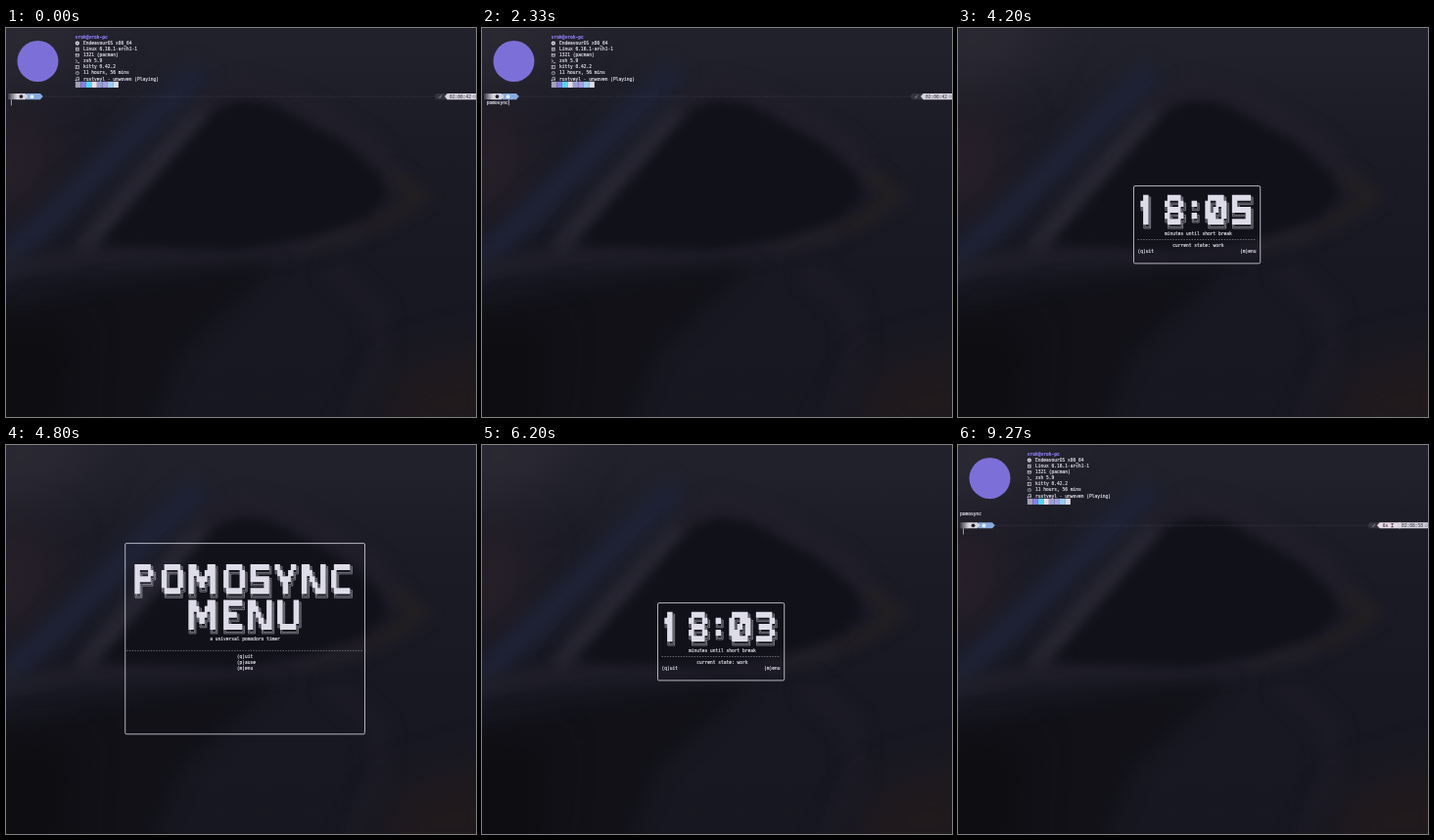
Animation of 480x398 px, one loop 9340 ms. Source, as an HTML page with a canvas:

```html
<!DOCTYPE html>
<html lang="en">
<head>
<meta charset="utf-8">
<title>Terminal pomodoro</title>
<style>
html, body { margin: 0; width: 100%; height: 100%; overflow: hidden; background: #17161f; }
canvas { display: block; width: 480px; height: 398px; }
</style>
</head>
<body>
<canvas id="stage"></canvas>
<script>
const W = 480, H = 398, LOOP = 9340;
const CW = 2.75, RH = 6.1, X0 = 2.1, Y0 = 6.05;   // terminal grid
const FONT = '"DejaVu Sans Mono", monospace';
const LIGHT = '#dddce8', TEXT = '#dedde8', PURPLE = '#8b7cf0';

const dpr = window.devicePixelRatio || 1;
const canvas = document.getElementById('stage');
canvas.width = W * dpr;
canvas.height = H * dpr;
const ctx = canvas.getContext('2d');

const colX = c => X0 + c * CW;
const rowY = r => Y0 + r * RH;
const midY = r => rowY(r) + RH / 2;

// Block letters with double-line shadows, six rows each
const glyphs = {
  P: ['██████╗  ', '██╔══██╗ ', '██████╔╝ ', '██╔═══╝  ', '██║      ', '╚═╝      '],
  O: [' ██████╗ ', '██╔═══██╗', '██║   ██║', '██║   ██║', '╚██████╔╝', ' ╚═════╝ '],
  M: ['███╗   ███╗ ', '████╗ ████║ ', '██╔████╔██║ ', '██║╚██╔╝██║ ', '██║ ╚═╝ ██║ ', '╚═╝     ╚═╝ '],
  S: ['███████╗', '██╔════╝', '███████╗', '╚════██║', '███████║', '╚══════╝'],
  Y: ['██╗   ██╗', '╚██╗ ██╔╝', ' ╚████╔╝ ', '  ╚██╔╝  ', '   ██║   ', '   ╚═╝   '],
  N: ['███╗   ██╗', '████╗  ██║', '██╔██╗ ██║', '██║╚██╗██║', '██║ ╚████║', '╚═╝  ╚═══╝'],
  C: [' ██████╗', '██╔════╝', '██║     ', '██║     ', '╚██████╗', ' ╚═════╝'],
  E: ['███████╗', '██╔════╝', '█████╗  ', '██╔══╝  ', '███████╗', '╚══════╝'],
  U: ['██╗   ██╗', '██║   ██║', '██║   ██║', '██║   ██║', '╚██████╔╝', ' ╚═════╝ '],
  0: [' ██████╗ ', '██╔═████╗', '██║██╔██║', '████╔╝██║', '╚██████╔╝', ' ╚═════╝ '],
  1: [' ██╗    ', '███║    ', '╚██║    ', ' ██║    ', ' ██║    ', ' ╚═╝    '],
  3: ['██████╗ ', '╚════██╗', ' █████╔╝', ' ╚═══██╗', '██████╔╝', '╚═════╝ '],
  4: ['██╗  ██╗', '██║  ██║', '███████║', '╚════██║', '     ██║', '     ╚═╝'],
  5: ['███████╗', '██╔════╝', '███████╗', '╚════██║', '███████║', '╚══════╝'],
  6: [' ██████╗ ', '██╔════╝ ', '███████╗ ', '██╔═══██╗', '╚██████╔╝', ' ╚═════╝ '],
  7: ['███████╗', '╚════██║', '    ██╔╝', '   ██╔╝ ', '   ██║  ', '   ╚═╝  '],
  8: [' █████╗ ', '██╔══██╗', '╚█████╔╝', '██╔══██╗', '╚█████╔╝', ' ╚════╝ '],
  ':': ['     ', ' ██╗ ', ' ╚═╝ ', ' ██╗ ', ' ╚═╝ ', '     ']
};
const corners = { '╔': [1, 1], '╗': [-1, 1], '╚': [1, -1], '╝': [-1, -1] };

function rect(x, y, w, h, color) {
  ctx.fillStyle = color;
  ctx.fillRect(x, y, w, h);
}

function poly(points, color, c = ctx) {
  c.fillStyle = color;
  c.beginPath();
  points.forEach(([x, y]) => c.lineTo(x, y));
  c.fill();
}

function line(points, color, width, c = ctx) {
  c.strokeStyle = color;
  c.lineWidth = width;
  c.beginPath();
  points.forEach(([x, y]) => c.lineTo(x, y));
  c.stroke();
}

function disc(x, y, r, color) {
  ctx.fillStyle = color;
  ctx.beginPath();
  ctx.arc(x, y, r, 0, Math.PI * 2);
  ctx.fill();
}

// Drawn large and scaled down so the advance stays exact
function text(str, col, row, color = TEXT, weight = '') {
  ctx.save();
  ctx.translate(colX(col), midY(row) + 1.7);
  ctx.scale(0.1, 0.1);
  ctx.font = `${weight} ${CW * 10 / 0.602}px ${FONT}`;
  ctx.fillStyle = ctx.strokeStyle = color;
  ctx.lineWidth = 1.6;
  ctx.fillText(str, 0, 0);
  ctx.strokeText(str, 0, 0);
  ctx.restore();
}

function shadowCell(ch, x, y) {
  const a = 0.65, b = 0.75, hw = CW / 2, hh = RH / 2;
  const seg = (...pts) => pts.forEach(([px, py], i) =>
    i ? ctx.lineTo(x + px, y + py) : ctx.moveTo(x + px, y + py));
  for (const k of [-1, 1]) {
    if (ch === '═') seg([-hw, k * b], [hw, k * b]);
    else if (ch === '║') seg([k * a, -hh], [k * a, hh]);
    else {
      const [sx, sy] = corners[ch];
      seg([sx * hw, k * sy * b], [k * sx * a, k * sy * b], [k * sx * a, sy * hh]);
    }
  }
}

function bigText(str, col, row) {
  const solid = new Path2D();
  ctx.beginPath();
  for (const letter of str) {
    const rows = glyphs[letter];
    rows.forEach((cells, r) => {
      for (const run of cells.matchAll(/█+/g))
        solid.rect(colX(col + run.index), rowY(row + r), run[0].length * CW, RH);
      [...cells].forEach((ch, c) => {
        if (ch !== ' ' && ch !== '█') shadowCell(ch, colX(col + c + 0.5), midY(row + r));
      });
    });
    col += rows[0].length + 1;
  }
  ctx.strokeStyle = LIGHT;
  ctx.lineWidth = 0.5;
  ctx.stroke();
  ctx.fillStyle = LIGHT;
  ctx.fill(solid);
}

function frame(c0, r0, c1, r1) {
  ctx.strokeStyle = LIGHT;
  ctx.lineWidth = 0.8;
  ctx.beginPath();
  ctx.roundRect(colX(c0 + 0.5), midY(r0), (c1 - c0) * CW, (r1 - r0) * RH, 1.4);
  ctx.stroke();
}

function dashes(x0, x1, y, color, width) {
  ctx.setLineDash([1.4, CW - 1.4]);
  line([[x0, y], [x1, y]], color, width);
  ctx.setLineDash([]);
}

function makeBackdrop() {
  const layer = document.createElement('canvas');
  layer.width = W;
  layer.height = H;
  const c = layer.getContext('2d');
  c.lineJoin = 'round';
  const base = c.createLinearGradient(0, 0, 0, H);
  base.addColorStop(0, '#22222d');
  base.addColorStop(0.25, '#1c1c27');
  base.addColorStop(0.6, '#181823');
  base.addColorStop(1, '#171721');
  c.fillStyle = base;
  c.fillRect(0, 0, W, H);
  const blob = (blur, color, ...points) => {
    c.filter = `blur(${blur}px)`;
    poly(points, color, c);
  };
  const band = (blur, color, width, ...points) => {
    c.filter = `blur(${blur}px)`;
    line(points, color, width, c);
  };
  // Warm and cool haze
  blob(24, '#2a2832', [-40, -40], [110, -40], [60, 50], [-40, 70]);
  blob(22, '#261f28', [-40, 90], [50, 85], [40, 175], [-40, 205]);
  band(9, '#1f2336', 26, [-20, 255], [55, 185], [165, 75], [200, 45]);
  // Light rim around the dark hollow
  band(7, '#282733', 20, [78, 228], [130, 165], [205, 82]);
  band(8, '#211f2a', 20, [200, 80], [240, 62], [290, 74], [370, 120], [405, 165]);
  band(7, '#231f22', 16, [395, 150], [425, 172], [380, 200], [300, 222]);
  band(8, '#201f2a', 18, [-20, 250], [90, 232], [250, 231], [360, 210]);
  blob(6, '#11111a', [96, 222], [150, 160], [214, 84], [240, 74], [272, 78],
    [345, 118], [382, 150], [388, 172], [365, 195], [310, 215], [235, 226]);
  // Lower folds
  blob(10, '#111117', [-30, 292], [110, 262], [275, 240], [240, 275], [180, 330], [140, 430], [-30, 430]);
  blob(20, '#0e0e12', [-40, 310], [70, 300], [60, 430], [-40, 430]);
  band(9, '#1c1b26', 16, [330, 245], [380, 290], [382, 340], [345, 410]);
  blob(20, '#201a1d', [400, 350], [510, 320], [510, 430], [375, 430]);
  return layer;
}
const backdrop = makeBackdrop();

function infoIcons() {
  const x = colX(25) + 2, at = r => midY(r) + 0.4;
  const box = (r, h) => {
    ctx.strokeStyle = TEXT;
    ctx.lineWidth = 0.6;
    ctx.strokeRect(x - 1.7, at(r) - h / 2, 3.5, h);
  };
  disc(x, at(1), 2.1, TEXT);
  disc(x, at(1), 0.7, '#20202b');
  rect(x - 1.8, at(2) - 1.9, 3.6, 3.8, '#b5b4c2');
  rect(x - 0.5, at(2) - 1.2, 1, 2.4, '#3a3946');
  box(3, 2.6);
  line([[x - 1.7, at(3)], [x + 1.8, at(3)]], TEXT, 0.6);
  line([[x - 1.8, at(4) - 1.7], [x - 0.2, at(4)], [x - 1.8, at(4) + 1.5]], TEXT, 0.7);
  line([[x, at(4) + 1.7], [x + 2.2, at(4) + 1.7]], TEXT, 0.7);
  box(5, 3.4);
  line([[x - 0.9, at(5) - 0.7], [x, at(5)], [x - 0.9, at(5) + 0.7]], TEXT, 0.5);
  ctx.beginPath();
  ctx.arc(x, at(6), 1.7, 0, Math.PI * 2);
  ctx.stroke();
  line([[x, at(6) - 1], [x, at(6)], [x + 0.9, at(6)]], TEXT, 0.5);
  line([[x - 0.9, at(7) + 1.3], [x - 0.9, at(7) - 1.6], [x + 1.6, at(7) - 1.9], [x + 1.6, at(7) + 0.9]], TEXT, 0.6);
  disc(x - 1.4, at(7) + 1.3, 0.8, TEXT);
  disc(x + 1.1, at(7) + 0.9, 0.8, TEXT);
}

function systemInfo() {
  disc(32.5, 34, 21, '#7c70d8');
  text('vrok@vrok-pc', 25, 0, PURPLE, 'bold');
  ['EndeavourOS x86_64', 'Linux 6.16.1-arch1-1', '1321 (pacman)', 'zsh 5.9', 'kitty 0.42.2',
   '11 hours, 56 mins', 'rustveyl - unwoven (Playing)'].forEach((s, i) => text(s, 28, i + 1));
  infoIcons();
  ['#a3a2b4', '#8b7de8', '#55d6f0', '#f0dbe8', '#979fd6', '#a3a0e2', '#9bcdf0', '#dcdce6']
    .forEach((color, i) => rect(colX(25 + i * 2), rowY(8), CW * 2, RH, color));
}

function prompt(row, clock, elapsed) {
  const y = rowY(row), m = midY(row), b = y + RH;
  const fade = ctx.createLinearGradient(2, 0, 11, 0);
  fade.addColorStop(0, 'rgba(215,213,222,.12)');
  fade.addColorStop(1, 'rgba(215,213,222,1)');
  rect(2, y, 9, RH, fade);
  poly([[21, y], [35, y], [37.8, m], [35, b], [21, b]], '#86abdf');
  poly([[11, y], [20, y], [22.6, m], [20, b], [11, b]], '#d7d5de');
  disc(15.5, m, 1.9, '#24232c');
  poly([[26.5, m - 2.2], [29, m], [28.2, m], [28.2, m + 2], [24.8, m + 2], [24.8, m], [24, m]], '#e8eef8');

  const left = elapsed ? 418 : 437, split = elapsed ? 428 : 448;
  dashes(38, left, m, 'rgba(160,160,185,.3)', 0.6);
  poly([[left, m], [left + 2.6, y], [480, y], [480, b], [left + 2.6, b]], '#34333f');
  line([[left + 5, m + 0.3], [left + 6, m + 1.4], [left + 7.8, m - 1.5]], '#b9c7c4', 0.6);
  if (elapsed) {
    poly([[split, m], [split + 2.6, y], [452, y], [452, b], [split + 2.6, b]], '#ead9e6');
    text(elapsed, 157, row, '#55505f');
    poly([[442, m - 2], [445, m - 2], [442, m + 2], [445, m + 2]], '#45404e');
  }
  const x = elapsed ? 447.5 : split;
  poly([[x, m], [x + 2.6, y], [480, y], [480, b], [x + 2.6, b]], '#d7d4de');
  text(clock, 164, row, '#5a5866');
  ctx.strokeStyle = '#6a6876';
  ctx.lineWidth = 0.5;
  ctx.beginPath();
  ctx.arc(478.2, m, 1.3, 0, Math.PI * 2);
  ctx.stroke();
}

function cursor(col, row, alpha = 0.85) {
  rect(colX(col) + 0.1, rowY(row), 0.8, RH, `rgba(215,214,228,${alpha})`);
}

function shellBefore(t) {
  const typed = t < 70 ? 0 : Math.min(8, 1 + Math.floor((t - 70) / 220));
  systemInfo();
  prompt(10, '02:06:42');
  text('pomosync'.slice(0, typed), 1, 11);
  cursor(1 + typed, 11);
}

function shellAfter(t) {
  systemInfo();
  text('pomosync', 0, 10);
  if (t < 8130) return;
  prompt(12, '02:06:58', '6s');
  const glow = Math.min(1, Math.max(0, (t - 8730) / 200));
  cursor(1, 13, 0.6 + 0.25 * glow);
}

function timer(t) {
  const left = t < 3200 ? 7 : t < 4200 ? 6 : t < 5200 ? 5 : t < 6200 ? 4 : 3;
  frame(64, 25, 111, 38);
  bigText('18:0' + left, 67, 27);
  text('minutes until short break', 76, 33);
  dashes(colX(66), colX(110), midY(34), '#a5a4b2', 0.6);
  text('current state: work', 79, 35);
  text('(q)uit', 66, 36);
  text('(m)enu', 104, 36);
}

function menu() {
  frame(43, 15, 132, 47);
  bigText('POMOSYNC', 47, 19);
  bigText('MENU', 67, 25);
  text('a universal pomodoro timer', 75, 31);
  dashes(colX(44), colX(132), midY(33), '#a5a4b2', 0.6);
  ['(q)uit', '(p)ause', '(m)enu'].forEach((s, i) => text(s, 85, 34 + i));
}

function draw(t) {
  ctx.setTransform(dpr, 0, 0, dpr, 0, 0);
  ctx.drawImage(backdrop, 0, 0);
  if (t < 2400) shellBefore(t);
  else if (t >= 8000) shellAfter(t);
  else if (t >= 4800 && t < 5530) menu();
  else timer(t);
}

const start = performance.now();
function tick() {
  draw((performance.now() - start) % LOOP);
  requestAnimationFrame(tick);
}
tick();
</script>
</body>
</html>
```
